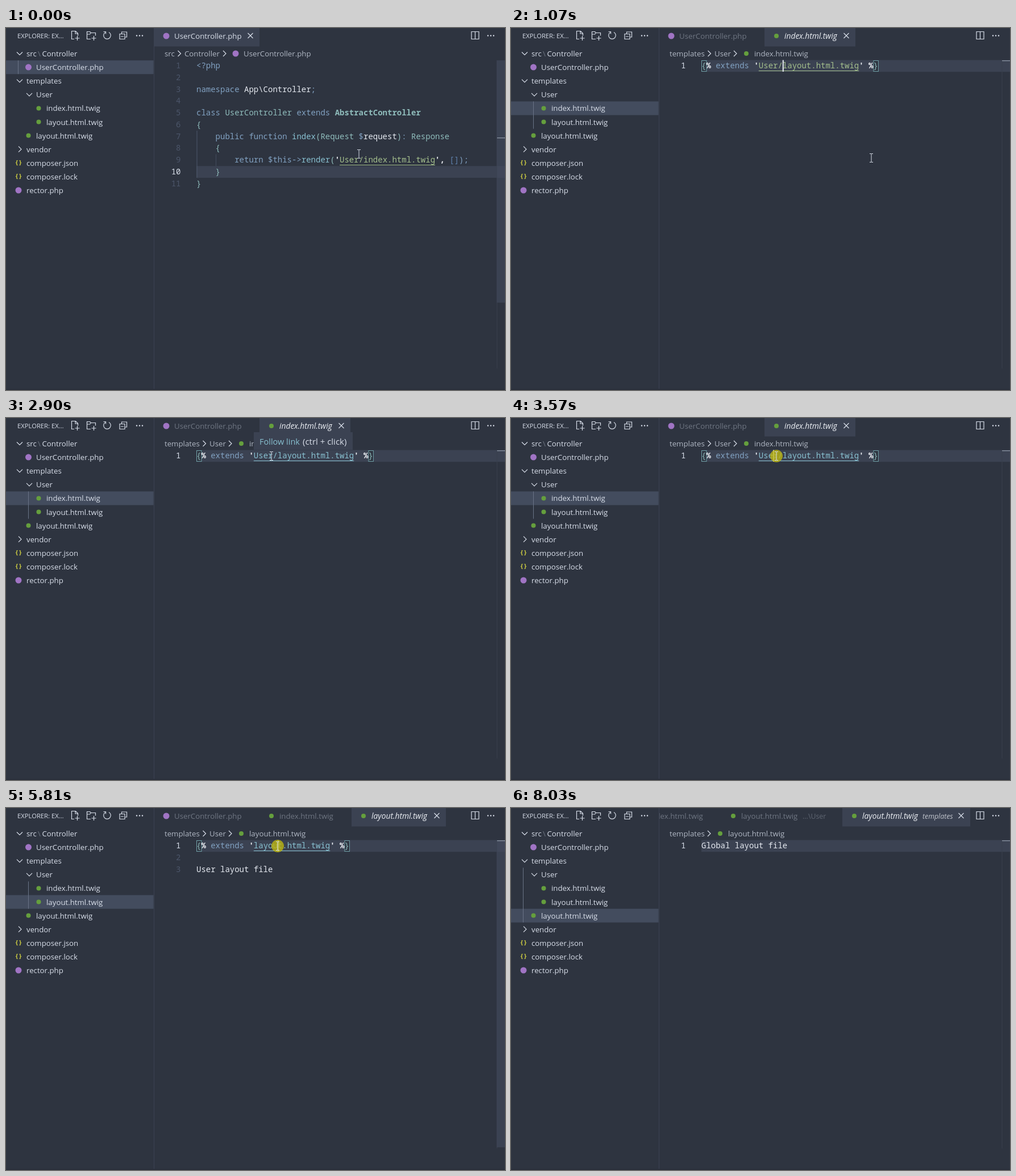
An HTML page that plays this animation: 878x638 px, repeating every 8.15 s.

```html
<!DOCTYPE html>
<html lang="en">
<head>
<meta charset="utf-8">
<title>Follow template links</title>
<style>
html, body { margin: 0; width: 100%; height: 100%; overflow: hidden; background: #2e3440; }
svg { display: block; width: 878px; height: 638px; }
text { font: 13.25px "Open Sans", "Noto Sans", sans-serif; fill: #d8dee9; white-space: pre; }
.code { font: 14px "Noto Sans Mono", "DejaVu Sans Mono", monospace; }
.italic { font-size: 13.85px; font-style: italic; fill: #eceff4; }
.small { font-size: 12px; }
.dim { fill: #6f7682; }
.crumb { fill: #b0b7c3; }
.num { text-anchor: end; fill: #4c566a; }
.num.on { fill: #d8dee9; }
.k { fill: #81a1c1; }
.t { fill: #8fbcbb; }
.f { fill: #88c0d0; }
.w { fill: #e5e9f0; }
.a { fill: #5e81ac; }
.T { fill: #8fbcbb; font-weight: 700; }
.q { fill: #eceff4; font-weight: 700; }
.l { fill: #a3be8c; }
.hot .l { fill: #88c0d0; }
.line { fill: none; stroke: #d8dee9; stroke-width: 1.2; }
</style>
</head>
<body>
<svg id="stage" viewBox="0 0 878 638"></svg>
<script>
const LOOP = 8150, LEFT = 335, CHAR = 8.4, LINE = 20.75, TOP = 56.5, ROW = 24.1;
const PHP = "UserController.php", INDEX = "index.html.twig", LAYOUT = "layout.html.twig";

// Code tokens are written as class:text and parted by "|".
const scenes = [
  {
    start: 0, row: 1, guide: [21, 1, 1], active: 9, slider: 484, mark: 193,
    tabs: [[261, PHP]],
    crumbs: [[279, "src"], [314, "Controller"], [418, PHP]],
    code: ["k:<?php", "", "k:namespace |w:App\\Controller|k:;", "",
      "k:class |t:UserController|k: extends |T:AbstractController", "t:{",
      "k:    public function |f:index|t:(Request |k:$|w:request|t:)|k:: |t:Response",
      "t:    {",
      "k:        return $this->|f:render|t:(|q:'|l:User/index.html.twig|q:',|a: []|k:);",
      "t:    }", "t:}"],
    link: [8, 30, 20]
  },
  {
    start: 1010, row: 4, guide: [39, 4, 5], active: 0, slider: 0, mark: 57,
    tabs: [[261, PHP], [446, INDEX]],
    crumbs: [[279, "templates"], [358, "User"], [428, INDEX]],
    code: ["t:{|q:%|k: extends |q:'|l:User/layout.html.twig|q:' %|t:}"],
    link: [0, 12, 21], brackets: [0, 36]
  },
  {
    start: 3760, row: 5, guide: [39, 4, 5], active: 0, slider: 598, mark: 57,
    tabs: [[261, PHP], [446, INDEX], [608, LAYOUT]],
    crumbs: [[279, "templates"], [358, "User"], [428, LAYOUT]],
    code: ["t:{|q:%|k: extends |q:'|l:layout.html.twig|q:' %|t:}", "", "w:User layout file"],
    link: [0, 12, 16], brackets: [0, 31]
  },
  {
    start: 5950, row: 6, guide: [21, 3, 6], active: 0, slider: 0, mark: 57,
    tabs: [[208, INDEX], [370, LAYOUT, 143, "...\\User"], [583, LAYOUT, 141, "templates"]],
    crumbs: [[279, "templates"], [382, LAYOUT]],
    code: ["w:Global layout file"]
  }
];

// Mouse path: time, x, y
const path = [[0, 621, 222], [50, 621, 222], [380, 634, 229], [1570, 634, 229],
  [2140, 476, 90], [2330, 467, 67], [4580, 467, 67], [4900, 474, 136], [5350, 478, 67],
  [6360, 478, 67], [6500, 505, 218], [7390, 505, 218], [7660, 829, 623], [7720, 900, 711]];
// Visible carets: from, to, column, line
const carets = [[690, 1010, 5, 9], [1010, 1570, 17, 0], [2070, 2580, 17, 0], [3080, 3570, 17, 0],
  [3570, 3760, 15, 0], [3760, 4280, 20, 0], [4780, 5280, 20, 0], [5740, 5950, 17, 0],
  [5950, 6430, 18, 0], [6950, 7450, 18, 0], [7900, 8030, 18, 0]];
const tips = [[690, 1010, 588, 191], [2580, 3570, 436, 25]];
const clicks = [[880, 1010], [3570, 3760], [5740, 5950]];
const hots = [[380, 1010], [2900, 3760], [5420, 5950]];
const hands = [[380, 1010], [3080, 3570], [5490, 5740]];

const esc = s => s.replace(/&/g, "&amp;").replace(/</g, "&lt;");
const text = (x, y, s, cls = "") => `<text x="${x}" y="${y}" class="${cls}">${esc(s)}</text>`;
const rect = (x, y, w, h, fill) => `<rect x="${x}" y="${y}" width="${w}" height="${h}" fill="${fill}"/>`;
const line = d => `<path class="line" d="${d}"/>`;
const dots = (x, y) => [-5, 0, 5].map(d => `<circle cx="${x + d}" cy="${y}" r="1.2" fill="#d8dee9"/>`).join("");
const right = (x, y) => line(`M${x - 2.5} ${y - 5}l5 5l-5 5`);
const down = (x, y) => line(`M${x - 5} ${y - 2.5}l5 5l5 -5`);
const badge = (x, y, name) => name.endsWith("php")
  ? `<circle cx="${x}" cy="${y}" r="5.5" fill="#a074c4"/>`
  : `<circle cx="${x}" cy="${y}" r="4" fill="#659f3d"/>`;
const braces = y => `<text x="15.5" y="${y + 3.5}" style="font:700 11px 'Noto Sans Mono',monospace;fill:#cbcb41">{}</text>`;

function tab([x, name, gap, note], on) {
  const w = note ? 225 : { [PHP]: 185, [INDEX]: 160, [LAYOUT]: 166 }[name];
  const cls = !on ? "dim" : name === PHP ? "" : "italic";
  let out = on ? rect(x, 0, w, 32.5, "#3b4252") : "";
  out += badge(x + 21, 14, name) + text(x + 35, 19, name, cls);
  if (note) out += `<text x="${x + gap}" y="19" class="${on ? "italic" : "dim"}" style="font-size:12.4px;opacity:.75">${esc(note)}</text>`;
  if (on) {
    const cx = x + w - 16;
    out += line(`M${cx - 4.5} 9l9 9m0 -9l-9 9`);
  }
  return out;
}

function crumbs(list) {
  return list.map(([x, name], i) => {
    const last = i === list.length - 1;
    return (i ? right(x - (last ? 33.5 : 9), 45) : "") +
      (last ? badge(x - 14, 45, name) : "") + text(x, 50, name, "crumb");
  }).join("");
}

function code(s) {
  return s.code.map((src, i) => {
    const y = TOP + 14.5 + i * LINE;
    const spans = src ? src.split("|").map(p => `<tspan class="${p[0]}">${esc(p.slice(2))}</tspan>`).join("") : "";
    return text(307.5, y, String(i + 1), "code num" + (i === s.active ? " on" : "")) +
      `<text class="code" x="${LEFT}" y="${y}">${spans}</text>`;
  }).join("");
}

function editor(s) {
  let out = rect(LEFT, TOP + s.active * LINE, 543, LINE, "#3b4252");
  out += rect(863.5, 57, 1, 543, "#383f4d");
  if (s.slider) out += rect(863.5, 57, 14.5, s.slider - 57, "#434c5e99");
  out += rect(864, s.mark, 14, 1.3, "#8b94a3");
  if (s.start === 0) {
    out += rect(335.5, TOP + 6 * LINE, 1, 4 * LINE, "#4c566a") + rect(369, TOP + 8 * LINE, 1, LINE, "#434c5e");
  }
  for (const col of s.brackets || []) {
    out += `<rect x="${LEFT + col * CHAR + .5}" y="57.5" width="8.5" height="19" fill="#2e3440" stroke="#71a1a8"/>`;
  }
  out += code(s);
  if (s.link) {
    const [row, col, n] = s.link;
    out += `<rect class="l" x="${LEFT + col * CHAR}" y="${Math.round(TOP + row * LINE + 18.5)}" width="${n * CHAR}" height="1"/>`;
  }
  return out + s.tabs.map((t, i) => tab(t, i === s.tabs.length - 1)).join("") + crumbs(s.crumbs);
}

function sidebar(s) {
  const y = i => 45 + i * ROW;
  const label = (i, x, name) => text(x, y(i) + 5, name);
  const file = (i, x, name) => badge(x - 13.5, y(i), name) + label(i, x, name);
  const [gx, from, to] = s.guide;
  return rect(0, 0, 260, 638, "#2e3440") + rect(260, 0, 1, 638, "#3b4252") +
    rect(0, y(s.row) - 12, 259.5, ROW, "#434c5e") +
    rect(gx, y(from) - 12, 1, (to - from + 1) * ROW, "#697386") +
    `<text x="20" y="18" style="font-size:11.26px">EXPLORER: EX…</text>` +
    down(24, 45) + label(0, 36, "src") + text(56, 50, "\\", "dim") + label(0, 63.5, "Controller") +
    file(1, 53, PHP) + down(24, y(2)) + label(2, 36, "templates") +
    down(41, y(3)) + label(3, 53, "User") + file(4, 71, INDEX) + file(5, 71, LAYOUT) +
    file(6, 53, LAYOUT) + right(24.5, y(7)) + label(7, 36, "vendor") +
    braces(y(8)) + label(8, 36, "composer.json") + braces(y(9)) + label(9, 36, "composer.lock") +
    badge(22, y(10), "php") + label(10, 36, "rector.php");
}

const toolbar =
  line("M120 19.5h-4.500v-14h7l4 4v4M122 5.500v4.500h4.500M125.500 14v8m-4 -4h8") +
  line("M149 19.500h-6.500v-13h5l2 2h8v5M142.500 11h5l2 -2.500M154.500 14v8m-4 -4h8") +
  line("M181 7.500a6.300 6.300 0 1 1 -6.500 .3M171.500 6.500h4v4") +
  line("M200 10.500h9v9h-9zM203.500 10.500v-3.500h9v9h-3.500M202 15h5") + dots(235, 13.5) +
  line("M819 6.500h13v13h-13zM825.500 6.500v13") + dots(853, 13.5);

const stage = document.getElementById("stage");
stage.innerHTML = rect(0, 0, 878, 638, "#2e3440") +
  scenes.map(s => `<g class="scene">${editor(s)}${sidebar(s)}</g>`).join("") + toolbar +
  rect(0, 636, 878, 2, "#292e39") +
  `<g id="tip">${rect(0, 0, 174, 31, "#3b4252")}
    <text x="10" y="22" style="font-size:14.5px;fill:#88c0d0">Follow link</text>
    <text x="86" y="22" style="font-size:15px">(ctrl + click)</text></g>
  <rect id="caret" width="2" height="20.500" fill="#e5e9f0"/>
  <g id="mouse"><circle id="click" r="11" fill="#bdb512" opacity=".8"/>
    <path id="beam" d="M-3 -7.500h2.500l.5 .5l.5 -.5h2.500M0 -7v14M-3 7.500h2.500l.5 -.5l.5 .5h2.500" fill="none" stroke="#d8dee9"/>
    <path id="hand" d="M0 1q2 -2 3.500 0v7q1.500 -1 3 .3q1.700 -.8 2.800 .7q2 -.4 2.200 1.500v4q0 2 -1.500 4v1.500h-8.500v-1.500l-5 -6.500q-.5 -2 1.500 -2l2 1.500z" fill="#fff" stroke="#222" stroke-width=".8"/></g>`;

const [tip, caret, mouse, click, beam, hand] =
  ["tip", "caret", "mouse", "click", "beam", "hand"].map(id => document.getElementById(id));
const groups = [...document.querySelectorAll(".scene")];
const at = (list, t) => list.find(([a, b]) => t >= a && t < b);
const show = (el, on) => { el.style.display = on ? "" : "none"; };
const move = (el, x, y) => el.setAttribute("transform", `translate(${x} ${y})`);

function mouseAt(t) {
  const i = path.findIndex(p => p[0] > t);
  if (i < 0) return path[path.length - 1].slice(1);
  const [a, b] = [path[i - 1], path[i]], k = (t - a[0]) / (b[0] - a[0]);
  return [1, 2].map(n => Math.round(a[n] + (b[n] - a[n]) * k));
}

function frame(now) {
  const t = now % LOOP;
  const current = scenes.filter(s => t >= s.start).length - 1;
  groups.forEach((g, i) => show(g, i === current));
  stage.classList.toggle("hot", !!at(hots, t));

  const c = at(carets, t);
  show(caret, c);
  if (c) move(caret, LEFT + c[2] * CHAR, TOP + c[3] * LINE);

  const p = at(tips, t);
  show(tip, p);
  if (p) {
    move(tip, p[2], p[3]);
    tip.style.opacity = Math.min(1, .35 + (t - p[0]) / 160);
  }

  const pointing = at(hands, t);
  show(hand, pointing);
  show(beam, !pointing);
  show(click, at(clicks, t));
  move(mouse, ...mouseAt(t));
}

const began = performance.now();
function tick() {
  frame(performance.now() - began);
  requestAnimationFrame(tick);
}
tick();
</script>
</body>
</html>
```
